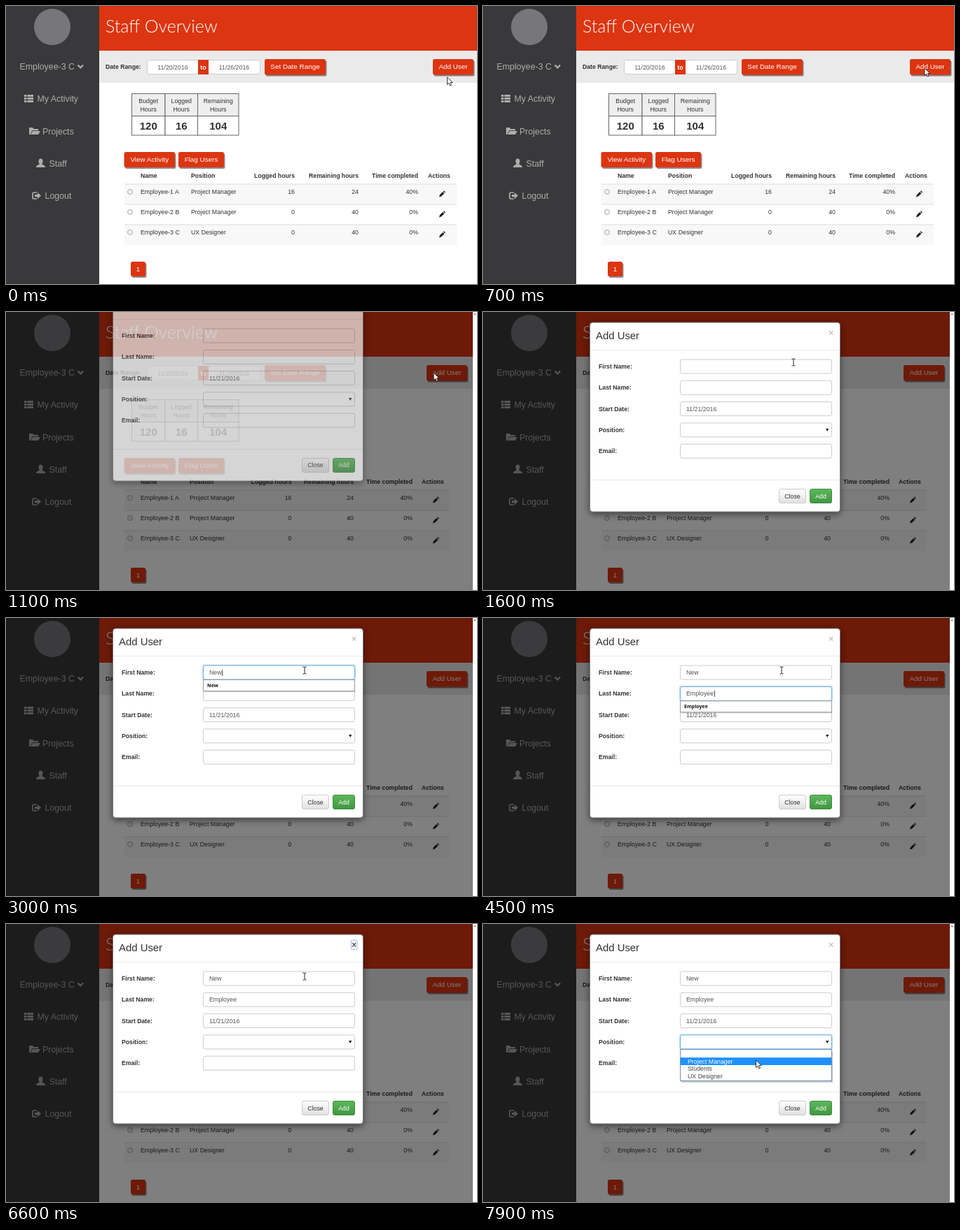
An HTML page that plays this animation: 672x398 px, repeating every 8000 ms.

```html
<!DOCTYPE html>
<html lang="en">
<head>
<meta charset="utf-8">
<title>Staff Overview</title>
<style>
  html, body { margin: 0; width: 100%; height: 100%; overflow: hidden; background: #fff; }
  svg { display: block; width: 672px; height: 398px; font: 8.8px "Liberation Sans", Arial, sans-serif; }
  #modal { filter: drop-shadow(0 3px 5px rgba(0,0,0,.5)); }
</style>
</head>
<body>
<svg viewBox="0 0 672 398">
  <defs>
    <linearGradient id="grey" x2="0" y2="1"><stop stop-color="#fff"/><stop offset="1" stop-color="#e0e0e0"/></linearGradient>
    <linearGradient id="green" x2="0" y2="1"><stop stop-color="#5cb85c"/><stop offset="1" stop-color="#419641"/></linearGradient>
  </defs>
  <g id="page"></g>
  <rect id="dim" width="666" height="398"/>
  <g id="bar"></g>
  <g id="modal"></g>
  <g id="cursor"></g>
</svg>
<script>
const LOOP = 8000, RED = '#dc3511', INK = '#333';
const $ = id => document.getElementById(id);
const clamp = v => Math.max(0, Math.min(1, v));
const smooth = v => v * v * (3 - 2 * v);

const rect = (x, y, w, h, fill, more = '') =>
  `<rect x="${x}" y="${y}" width="${w}" height="${h}" fill="${fill}" ${more}/>`;
const path = (d, more) => `<path d="${d}" ${more}/>`;
const text = (x, y, s, { size = 8.8, fill = INK, bold, anchor = 'start', more = '' } = {}) =>
  `<text x="${x}" y="${y}" font-size="${size}" fill="${fill}" text-anchor="${anchor}" ${bold ? 'font-weight="700"' : ''} ${more}>${s}</text>`;
const mid = (x, y, s, o) => text(x, y, s, { ...o, anchor: 'middle' });
const end = (x, y, s, o) => text(x, y, s, { ...o, anchor: 'end' });
const box = (x, y, w, h, fill = '#fff', stroke = '#ccc', r = 2.5) =>
  rect(x + .5, y + .5, w - 1, h - 1, fill, `stroke="${stroke}" rx="${r}"`);
const button = (x, y, w, h, s) =>
  rect(x + 1.5, y + 2, w, h, '#000', 'opacity=".45" rx="2.5"') +
  rect(x, y, w, h, RED, 'rx="2.5"') + mid(x + w / 2, y + h / 2 + 3, s, { size: 9.9, fill: '#fff' });

function sidebar() {
  const c = '#adadad', item = (x, y, s) => text(x, y, s, { size: 12.4, fill: c });
  let list = '';
  for (let i = 0; i < 3; i++)
    list += rect(26, 127 + i * 4, 3.5, 3, c) + rect(30.5, 127 + i * 4, 8.5, 3, c);
  return rect(0, 0, 133, 398, '#39393b') +
    '<circle cx="66" cy="30" r="26" fill="#77777a"/>' +
    item(19.5, 91, 'Employee-3 C') + item(44.5, 137, 'My Activity') + item(52, 184, 'Projects') +
    item(61.5, 230, 'Staff') + item(55.5, 276, 'Logout') + list +
    path('M102.5 84.5l3.8 3.8 3.8-3.8', `fill="none" stroke="${c}" stroke-width="2.4"`) +
    path('M33 184V174h5l1.5 2H46v2.2h-8.5l-3 5.8zM35 184l3.2-5H49l-3 5z', `fill="${c}"`) +
    `<ellipse cx="49.5" cy="222.3" rx="3" ry="3.8" fill="${c}"/>` +
    path('M43 231q0-3 4.5-4.2v-2h4v2q4.500 1.200 4.500 4.200z', `fill="${c}"`) +
    path('M44 267h-4a2 2 0 0 0-2 2v5a2 2 0 0 0 2 2h4', `fill="none" stroke="${c}" stroke-width="1.7"`) +
    path('M41 270h4v-3l5 4.600-5 4.600v-3h-4z', `fill="${c}"`);
}

function summary() {
  const cells = [[179.5, 227, 'Budget', 120], [227, 273.5, 'Logged', 16], [273.500, 332, 'Remaining', 104]];
  return cells.map(([a, b, name, n]) => {
    const m = (a + b) / 2, line = 'stroke="#666"';
    return rect(a, 125.5, b - a, 32, '#efeeef', line) + rect(a, 157.5, b - a, 27.5, '#fff', line) +
      mid(m, 138.5, name) + mid(m, 150.5, 'Hours') + mid(m, 176.5, n, { size: 15, bold: true });
  }).join('');
}

// The content narrows when the modal's scrollbar takes its place.
function page(narrow) {
  const at = (wide, slim) => narrow ? slim : wide;
  const pos = at(264, 262), logged = at(412, 407.5), left = at(503, 496), done = at(588, 580), act = at(602, 593);
  const right = at(643, 632), b = { bold: true, size: 8.7 };
  const rows = [['1 A', 'Project Manager', 16, 24, 40], ['2 B', 'Project Manager', 0, 40, 0], ['3 C', 'UX Designer', 0, 40, 0]];
  return rect(133, 0, 539, 398, '#fff') + rect(133, 0, 539, 64, RED) + rect(133, 64, 539, 46, '#ebeaeb') + sidebar() +
    text(142, 38, 'Staff Overview', { size: 25, fill: '#fff', more: 'font-family="Lato, sans-serif" font-weight="300"' }) +
    text(142, 90, 'Date Range:', b) +
    box(201, 77, 74, 21) + box(288, 77, 75, 21) + rect(274, 77, 15, 21, RED) +
    mid(238, 90.5, '11/20/2016', { fill: '#555' }) + mid(325.5, 90.5, '11/26/2016', { fill: '#555' }) +
    mid(281.5, 90.5, 'to', { bold: true, fill: '#fff' }) +
    button(369, 76, 87, 22.5, 'Set Date Range') + button(at(609, 600), 76, 58, 22.5, 'Add User') +
    summary() + button(168.5, 209, 72.5, 22, 'View Activity') + button(246, 209, 65, 22, 'Flag Users') +
    text(192, 245.5, 'Name', b) + text(pos, 245.5, 'Position', b) + end(logged, 245.5, 'Logged hours', b) +
    end(left, 245.5, 'Remaining hours', b) + end(done, 245.5, 'Time completed', b) + text(act, 245.5, 'Actions', b) +
    rows.map(([id, job, a, r, pct], i) => {
      const y = 255 + i * 29, t = y + 14;
      return rect(169, y, right - 169, 29, i % 2 ? '#fff' : '#f8f8f8') + rect(169, y - .5, right - 169, 1, '#ddd') +
        `<circle cx="177" cy="${y + 11}" r="3.500" fill="#f1f1f1" stroke="#aaa"/>` +
        text(192, t, 'Employee-' + id) + text(pos, t, job) + end(logged, t, a) + end(left, t, r) + end(done, t, pct + '%') +
        path('M-4.500 4.500l.9-3.200 4.300-4.300 2.200 2.200-4.300 4.300zM1.400-3.700l1-1 2.200 2.200-1 1z',
          `fill="#222" transform="translate(${act + 20.5} ${t})"`);
    }).join('') +
    button(178, 366, 21, 21, '1');
}

const fieldY = i => 67.5 + i * 30.300;

function suggestion(i, s) {
  const y = fieldY(i) + 20.500;
  return rect(283, y + 2, 215, 16, '#000', 'opacity=".2"') + box(281, y, 217, 17, '#fff', '#999', 0) +
    text(287, y + 11, s, { size: 7, bold: true, fill: '#111', more: 'font-family="Open Sans, sans-serif"' });
}

function options(y) {
  const top = 180, h = 10.800, hot = Math.max(0, Math.min(3, Math.floor((y - top) / h)));
  return rect(283, 183, 216, 44, '#000', 'opacity=".2"') + box(281, top - 1, 217, 46, '#fff', '#6d8fb5', 0) +
    rect(282, top + hot * h + .4, 215, h, '#1e90ff') +
    ['', 'Project Manager', 'Students', 'UX Designer'].map((s, i) =>
      text(292, top + i * h + 8.700, s, { fill: i === hot ? '#fff' : '#444' })).join('');
}

function modal(t, y) {
  const typed = (s, from, step) => s.slice(0, Math.max(0, Math.floor((t - from) / step) + 1));
  const first = typed('New', 2500, 200), last = typed('Employee', 3500, 110);
  const open = t >= 7500;
  const focus = t < 1900 ? -1 : t < 3400 ? 0 : t < 5100 ? 1 : t < 5600 ? 2 : t < 7400 ? 9 : 3;
  const values = [first, last, '11/21/2016', '', ''];
  const names = ['First Name:', 'Last Name:', 'Start Date:', 'Position:', 'Email:'];
  let out = box(152, 14.5, 358, 272, '#fff', '#777', 4) + text(161, 39, 'Add User', { size: 14.9 }) +
    rect(153, 54, 356, 1, '#e8e8e8') + rect(153, 240, 356, 1, '#e8e8e8');
  if (focus === 9) out += box(492, 22.5, 9.5, 14.5, '#fff', '#9dbbe6', 1);
  out += mid(496.700, 33.5, '×', { size: 12.5, bold: true, fill: focus === 9 ? '#555' : '#c4c4c4' });
  names.forEach((name, i) => {
    const fy = fieldY(i), on = focus === i;
    if (on) out += rect(280, fy - 1, 219, 23, '#66afe9', 'opacity=".35" rx="3"');
    out += text(165, fy + 13.5, name, { size: 8.7, bold: true }) +
      box(281, fy, 217, 21, '#fff', on ? '#66afe9' : '#ccc') +
      `<text x="290" y="${fy + 13.5}" fill="#555">${values[i]}${on && i < 2 ? '<tspan fill="#111">|</tspan>' : ''}</text>`;
  });
  out += path('M489 167h4.400l-2.200 4z', 'fill="#222"') +
    box(422, 253, 39, 21, 'url(#grey)') + mid(441.5, 266.5, 'Close') +
    box(466, 253, 32, 21, 'url(#green)', '#3e8f3e') + mid(482, 266.5, 'Add', { fill: '#fff' });
  if (first && t < 3300) out += suggestion(0, 'New');
  if (last && t < 4700) out += suggestion(1, 'Employee');
  if (open) out += options(y);
  return out;
}

const route = [[0, 629.5, 102], [100, 629.5, 102], [400, 630, 89], [1000, 630, 89], [1500, 443, 72], [1700, 443, 72],
  [2000, 426, 75], [6800, 426, 75], [7400, 402, 168], [7550, 402, 168], [7850, 389.5, 195], [8000, 389.5, 195]];

function pointer(t) {
  const i = route.findIndex(p => p[0] > t), [t0, x0, y0] = route[i - 1], [t1, x1, y1] = route[i];
  const k = smooth((t - t0) / (t1 - t0));
  return [x0 + (x1 - x0) * k, y0 + (y1 - y0) * k];
}

function cursor(x, y, t) {
  const beam = t > 1200 && x > 281 && x < 498 && [0, 1, 2].some(i => y > fieldY(i) && y < fieldY(i) + 21);
  const shape = beam
    ? path('M-2.500-5H-.8L0-4.200 .8-5H2.500M0-4.200V4.200M-2.500 5H-.8L0 4.200 .8 5H2.500', 'fill="none" stroke="#222"')
    : path('M0 0v10.500l2.500-2.300 1.700 3.800 1.900-.9-1.700-3.600h3.400z', 'fill="#fff" stroke="#222" stroke-width=".9"');
  return `<g transform="translate(${x} ${y})">${shape}</g>`;
}

const drawn = {};
function put(id, html) {
  if (drawn[id] !== html) $(id).innerHTML = drawn[id] = html;
}

const pages = [page(false), page(true)];
function frame(now) {
  const t = now % LOOP, [x, y] = pointer(t);
  const narrow = t >= 800, shown = t >= 1000;
  put('page', pages[+narrow]);
  $('dim').setAttribute('opacity', .5 * clamp((t - 760) / 180));
  put('bar', narrow ? rect(666, 0, 6, 398, '#fff') + (shown ? path('M667.500 4l1.700-2.500 1.700 2.500z', 'fill="#777"') : '') : '');
  put('modal', shown ? modal(t, y) : '');
  const slide = clamp((t - 1000) / 300);
  $('modal').setAttribute('transform', `translate(0 ${-100 * (1 - slide) ** 2})`);
  $('modal').setAttribute('opacity', clamp((t - 1000) / 150));
  put('cursor', cursor(x, y, t));
  requestAnimationFrame(frame);
}
requestAnimationFrame(frame);
</script>
</body>
</html>
```
